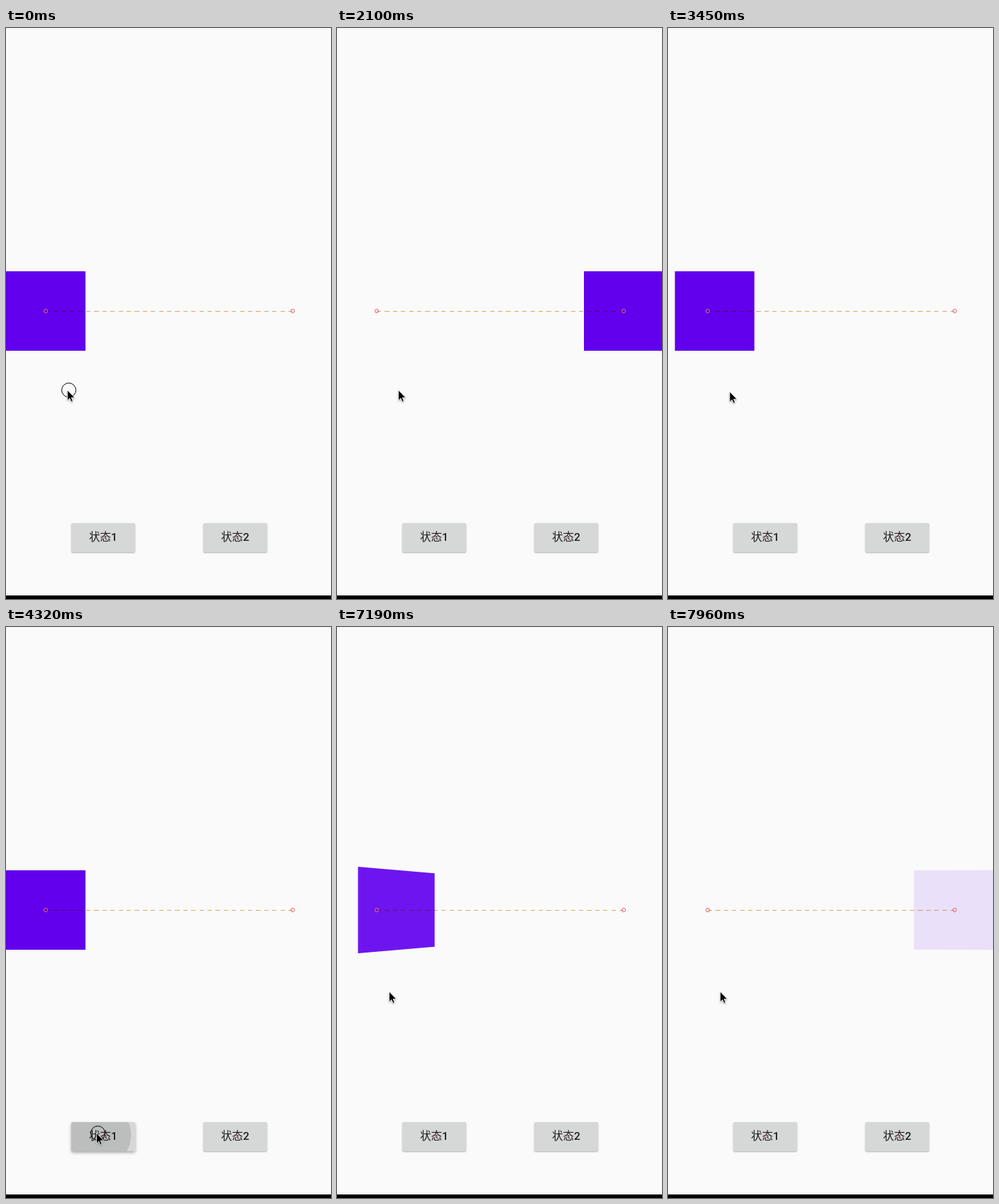
An HTML page for the animation above (8000 ms loop, 458 px wide and 805 px high).

```html
<!DOCTYPE html>
<html lang="zh">
<head>
<meta charset="utf-8">
<title>Motion</title>
<style>
  html, body { margin: 0; width: 100%; height: 100%; overflow: hidden; }
  #stage { position: relative; width: 458px; height: 805px; overflow: hidden; background: #fafafa; isolation: isolate; }
  #stage > * { position: absolute; }
  .top { left: 0; top: 0; width: 100%; height: 1px; background: #f0f0f0; }
  .bottom { left: 0; top: 800px; width: 100%; height: 5px; background: #000; }
  #box { left: 0; top: 343px; width: 112px; height: 112px; background: #6200ee; }
  .path {
    left: 56px; top: 399px; width: 348px; height: 1px; mix-blend-mode: multiply;
    background: repeating-linear-gradient(90deg, #dfac6b 0 6.2px, transparent 6.2px 11.4px);
  }
  .button {
    top: 698px; width: 90px; height: 41px; border-radius: 2px; overflow: hidden;
    background: #d6d7d7; box-shadow: 0 1px 2px rgba(0, 0, 0, .3);
    font: 400 15.5px/41px Roboto, "Noto Sans CJK SC", "Noto Sans CJK", sans-serif;
    text-align: center; color: #1f1f1f; white-space: nowrap;
  }
  .button b { font-weight: 500; }
  #first { left: 92px; }
  #second { left: 278px; }
  #ripple {
    position: absolute; left: 38px; top: 18px; width: 0; height: 0; border-radius: 50%;
    background: #000; transform: translate(-50%, -50%);
  }
  svg { left: 0; top: 0; }
  #arrow { filter: drop-shadow(0 1px 1px rgba(0, 0, 0, .35)); }
</style>
</head>
<body>
<div id="stage">
  <div class="top"></div>
  <div id="box"></div>
  <div class="button" id="first"><i id="ripple"></i>状态<b>1</b></div>
  <div class="button" id="second">状态<b>2</b></div>
  <div class="path"></div>
  <svg width="458" height="805" fill="none">
    <g stroke="#dd6a72">
      <circle cx="56" cy="399" r="2.6"/>
      <circle cx="404" cy="399" r="2.6"/>
      <g stroke-width=".8" opacity=".5">
        <circle cx="137" cy="717.5" r="2"/>
        <circle cx="323" cy="717.5" r="2"/>
      </g>
    </g>
    <g id="pointer">
      <circle id="ring" cx="2" cy="0" r="10" stroke="#000"/>
      <path id="arrow" d="M0 0V14.6L3.3 11.5L5.4 16.4L7.7 15.4L5.6 10.6H10.2Z" fill="#000" stroke="#fff" stroke-width=".8"/>
    </g>
  </svg>
  <div class="bottom"></div>
</div>
<script>
  const LOOP = 8000, STEP = 58.33, TRAVEL = 348;
  const get = id => document.getElementById(id);
  const box = get('box'), pointer = get('pointer'), ring = get('ring');
  const first = get('first'), ripple = get('ripple');

  const progress = (t, from, to) => Math.min(1, Math.max(0, (t - from) / (to - from)));
  const sine = p => (1 - Math.cos(Math.PI * p)) / 2;
  const cubic = p => p < .5 ? 4 * p ** 3 : 1 - 4 * (1 - p) ** 3;
  const slide = (t, start) => sine(progress(t, start, start + 1000));

  // Pointer moves: start, end, x, y, easing
  const moves = [
    [3370, 3970, 127.5, 713.5, cubic],
    [5600, 6380, 78, 490, sine],
    [6390, 6660, 73.5, 514, sine]
  ];
  const presses = [[0, 50], [950, 1070], [2460, 2575], [4210, 4325], [6840, 6960]];

  function pointerAt(t) {
    let x = 86.5, y = 510.5;
    for (const [from, to, endX, endY, ease] of moves) {
      const p = ease(progress(t, from, to));
      x += (endX - x) * p;
      y += (endY - y) * p;
    }
    return [x, y];
  }

  function drawBox(t) {
    const flip = slide(t, 6990);
    const x = TRAVEL * (slide(t, 1110) - slide(t, 2560) + flip);
    box.style.transform = `translateX(${x}px)` +
      (flip > 0 ? ` perspective(193px) rotateY(${180 * flip}deg)` : '');
    box.style.opacity = 1 - .9 * flip;
  }

  function drawButton(t) {
    const pressed = t >= 4210 && t < 4550;
    const size = pressed ? 30 + 100 * progress(t, 4210, 4390) : 0;
    ripple.style.width = ripple.style.height = size + 'px';
    ripple.style.opacity = .12 * (1 - progress(t, 4380, 4560));
    first.style.boxShadow = pressed ? '0 2px 4px rgba(0, 0, 0, .35)' : '';
  }

  function render(t) {
    // The screen refreshes in coarse steps.
    const held = Math.max(0, 945 + Math.floor((t - 930) / STEP) * STEP);
    drawBox(held);
    drawButton(t);
    pointer.setAttribute('transform', `translate(${pointerAt(held)})`);
    ring.style.display = presses.some(([a, b]) => t >= a && t < b) ? '' : 'none';
  }

  const begin = performance.now();
  function tick() {
    render((performance.now() - begin) % LOOP);
    requestAnimationFrame(tick);
  }
  tick();
</script>
</body>
</html>
```
